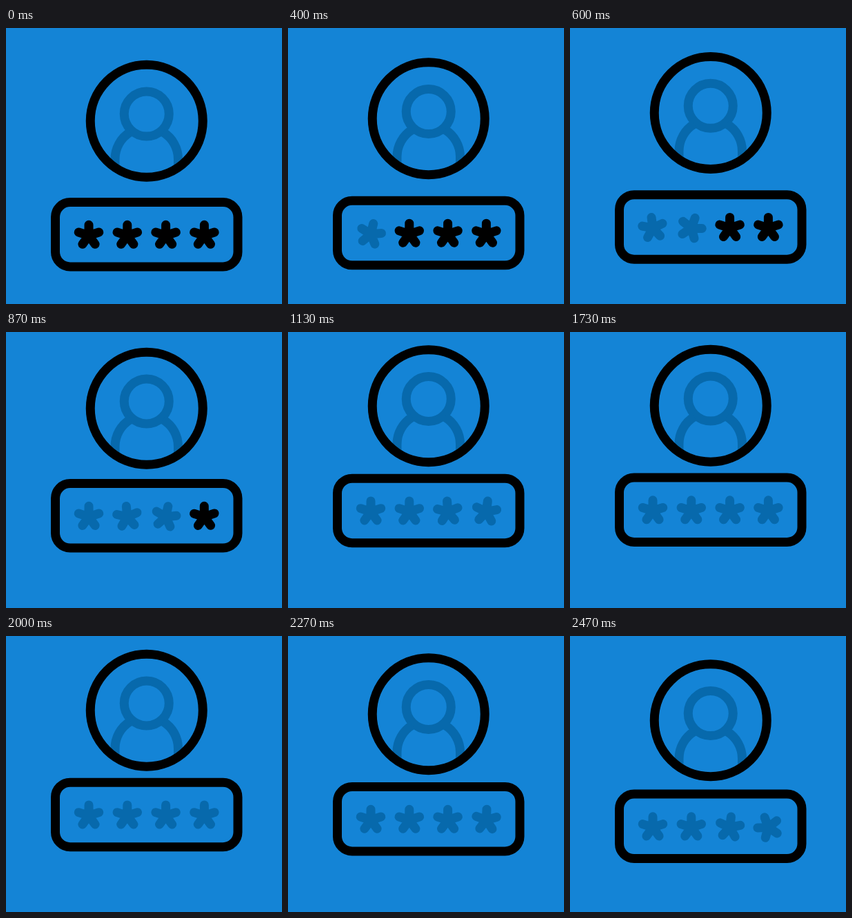
An HTML page that plays this animation: 400x400 px, repeating every 2.54 s.

```html
<!DOCTYPE html>
<html lang="en">
<head>
<meta charset="utf-8">
<title>Login</title>
<style>
  html, body { margin: 0; width: 100%; height: 100%; overflow: hidden; background: #1484d6; }
  svg { display: block; width: 100%; height: 100%; fill: none; stroke-width: 13; }
  .dim { stroke: #0769ac; }
  .line { stroke: #000; }
  #stars { stroke-linecap: round; stroke-linejoin: round; }
</style>
</head>
<body>
<svg viewBox="0 0 400 400">
  <g id="user">
    <g class="dim">
      <circle cx="203.75" cy="124.5" r="32.5"/>
      <path d="M180 150.9A45.75 45.75 0 0 0 158 190V200M227.5 150.9A45.75 45.75 0 0 1 249.5 190V200"/>
    </g>
    <circle class="line" cx="203.75" cy="134.75" r="81.5"/>
  </g>
  <g id="field">
    <rect class="line" x="71.5" y="252.5" width="264.5" height="93.5" rx="21.5"/>
    <g id="stars"></g>
  </g>
</svg>
<script>
  const LOOP = 2540, STEP = 230, BACK_STEP = 140;
  const user = document.getElementById('user');
  const field = document.getElementById('field');
  const holder = document.getElementById('stars');

  const clamp = x => Math.min(1, Math.max(0, x));
  const span = (t, a, b) => clamp((t - a) / (b - a));

  // Smooth curve through [time, value] points, held at both ends.
  function track(points, t) {
    const last = points.length - 1;
    if (t <= points[0][0]) return points[0][1];
    if (t >= points[last][0]) return points[last][1];
    const slope = i => i <= 0 || i >= last ? 0 :
      (points[i + 1][1] - points[i - 1][1]) / (points[i + 1][0] - points[i - 1][0]);
    const i = points.findIndex(p => p[0] > t) - 1;
    const [t0, a] = points[i], [t1, b] = points[i + 1];
    const d = t1 - t0, u = (t - t0) / d, v = 1 - u;
    return a * v * v * (1 + 2 * u) + b * u * u * (3 - 2 * u)
      + d * u * v * (slope(i) * v - slope(i + 1) * u);
  }

  // Rise in two eased halves, hold, then start to sink until the loop cuts.
  function lift(t, mid, midY, power, end, top, sink) {
    const up = t < mid
      ? midY * (t / mid) ** power
      : midY + (top - midY) * (1 - (1 - span(t, mid, end)) ** 4);
    return sink * span(t, 1690, LOOP) ** 3 - up;
  }

  const SPIN = [[170, 72], [290, 42], [390, 16], [490, 1], [590, -7], [650, -5], [740, 0]];
  const UNSPIN = [[2230, 0], [2340, 7], [2400, 0], [2470, -20], [2540, -42]];

  let arms = '';
  for (let k = 0; k < 5; k++) {
    const a = (k * 72 - 90) * Math.PI / 180;
    arms += `M0 0L${15.5 * Math.cos(a)} ${15.5 * Math.sin(a)}`;
  }
  const stars = [0, 1, 2, 3].map(() => {
    const star = document.createElementNS('http://www.w3.org/2000/svg', 'path');
    star.setAttribute('d', arms);
    return holder.appendChild(star);
  });

  const shift = (el, y) => el.setAttribute('transform', `translate(0 ${y})`);

  function draw(t) {
    shift(user, lift(t, 630, 13.5, 3, 1500, 28, 20));
    shift(field, lift(t, 700, 20, 4, 1530, 41.5, 23.3));
    stars.forEach((star, i) => {
      const phase = t - i * STEP;
      const angle = track(SPIN, phase) + track(UNSPIN, t - (3 - i) * BACK_STEP);
      const fade = span(phase, 185, 330);
      star.setAttribute('transform', `translate(${120 + i * 55.8} 300.8) rotate(${angle})`);
      star.setAttribute('stroke', `rgb(${7 * fade} ${105 * fade} ${172 * fade})`);
    });
  }

  const start = performance.now();
  function frame() {
    draw((performance.now() - start) % LOOP);
    requestAnimationFrame(frame);
  }
  frame();
</script>
</body>
</html>
```
